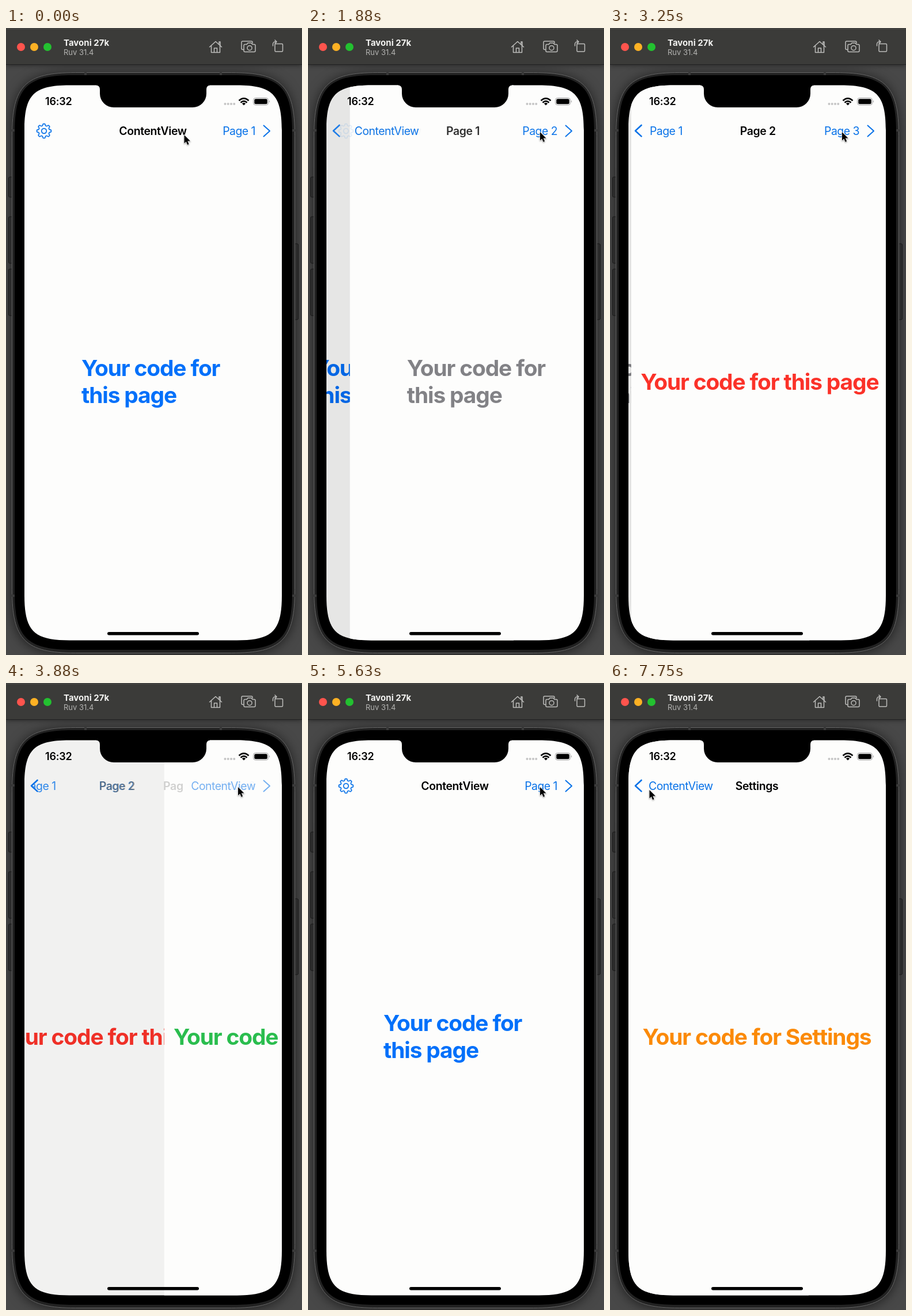
An HTML page for the animation above (8000 ms loop, 514 by 1090 pixels).

```html
<!DOCTYPE html>
<html lang="en">
<head>
<meta charset="utf-8">
<title>Navigation demo</title>
<style>
  html, body { margin: 0; width: 100%; height: 100%; overflow: hidden; background: #373737; }
  svg { display: block; font-family: Inter, sans-serif; }
  .line { fill: none; stroke-linecap: round; stroke-linejoin: round; }
  .title { font: 600 19.4px Inter, sans-serif; letter-spacing: -.35px; text-anchor: middle; }
  .label { font: 400 19.4px Inter, sans-serif; letter-spacing: -.5px; fill: #0872e8; }
  .body { font: 700 38.9px Inter, sans-serif; letter-spacing: -1.15px; }
</style>
</head>
<body>
<svg width="514" height="1090" viewBox="0 0 514 1090">
  <defs>
    <clipPath id="screen"><path data-box="32 99.500 447 965 54"/></clipPath>
    <clipPath id="backMask"><path d="M480 150H58V166L46 178.500L58 191V210H480Z"/></clipPath>
  </defs>

  <rect width="514" height="1090" fill="#484848"/>
  <path data-box="10.500 77.500 491 1009 76" fill="#222" style="filter:drop-shadow(0 2px 10px #0009)"/>
  <g fill="#2d2d2d" stroke="#191919">
    <rect x="4.500" y="259" width="8" height="35" rx="2"/>
    <rect x="4.500" y="328" width="8" height="81" rx="2"/>
    <rect x="4.500" y="419" width="8" height="81" rx="2"/>
    <rect x="499.500" y="375" width="8" height="132" rx="2"/>
  </g>
  <path data-box="10.500 77.500 491 1009 76" fill="#222" stroke="#676767"/>
  <path d="M10 178h5M497 178h5M10 987h5M497 987h5M138 77v5M373 77v5" stroke="#3a3a3a" stroke-width="4"/>
  <path data-box="15 82 482 999 70"/>

  <rect width="514" height="63" fill="#3b3b39" style="filter:drop-shadow(0 1px 4px #0008)"/>
  <path d="M0 1.500H514" stroke="#4b4b4a"/>
  <path d="M0 63.500H514" stroke="#222"/>
  <circle cx="26" cy="33" r="7" fill="#ff544d"/>
  <circle cx="49" cy="33" r="7" fill="#fdb124"/>
  <circle cx="72" cy="33" r="7" fill="#23c130"/>
  <text x="100" y="31" font-size="15" font-weight="700" fill="#f2f2f0">Tavoni 27k</text>
  <text x="100" y="47" font-size="13" fill="#b4b4b2">Ruv 31.4</text>
  <g class="line" stroke="#bdbdbb" stroke-width="1.500">
    <path d="M353.500 33L364 23.500L374.500 33M370 28.500V24h2v6M356.500 31V42.500H371.500V31M361.500 42V35h5v7"/>
    <path d="M412.500 37.500H411a2 2 0 0 1-2-2V25a2 2 0 0 1 2-2H426a2 2 0 0 1 2 2v1"/>
    <path d="M415 28.500h3l2-2.500h6l2 2.500h3a2 2 0 0 1 2 2V39.500a2 2 0 0 1-2 2H415a2 2 0 0 1-2-2V30.500a2 2 0 0 1 2-2Z"/>
    <circle cx="423" cy="34.700" r="4"/>
    <rect x="467" y="27.500" width="13.500" height="13.500" rx="1.500"/>
    <path d="M463.500 31V28a4 4 0 0 1 4-4h2M467 21l3 3l-3 3"/>
  </g>

  <g id="app" clip-path="url(#screen)"></g>

  <path d="M157 98V99.500Q163 100 163 107V114A24 24 0 0 0 187 138H324A24 24 0 0 0 348 114V107Q348 100 354 99.500V98Z"/>
  <text x="68" y="134.300" font-size="18" font-weight="600" letter-spacing="-.2">16:32</text>
  <g fill="#c5c5c5">
    <circle cx="380.500" cy="132" r="2"/><circle cx="385.700" cy="132" r="2"/>
    <circle cx="391" cy="132" r="2"/><circle cx="396.200" cy="132" r="2"/>
  </g>
  <path d="M404.500 126.200Q413 118.500 421.500 126.200M407.500 129.700Q413 124.700 418.500 129.700" fill="none" stroke="#000" stroke-width="2.600"/>
  <path d="M409.800 131.200Q413 128.600 416.200 131.200L413 134.500Z"/>
  <rect x="429.500" y="121.500" width="26" height="12.500" rx="4" fill="none" stroke="#a0a0a0"/>
  <rect x="431.200" y="123.200" width="22.600" height="9.100" rx="2.500"/>
  <path d="M457 125.500q2 2.200 0 4.400Z" fill="#999"/>
  <rect x="176" y="1050" width="159" height="5.500" rx="2.750"/>

  <path id="cursor" d="M0 0V14.500L3.300 11.500L5.600 17L8.100 16L5.800 10.600H10.500Z" stroke="#fff" stroke-width="1.200"
    paint-order="stroke" style="filter:drop-shadow(0 1px 1px #0006)"/>
</svg>
<script>
const LOOP = 8000, STEP = 125;
const LEFT = 32, WIDTH = 447, CENTER = 255, BACK_X = 67, RIGHT_X = 433;
const BLUE = '#0872e8';
const labelWidth = { ContentView: 111, Settings: 72 };
const widthOf = text => labelWidth[text] || 59;

const lines = ['Your code for', 'this page'], single = ['Your code for this page'];
const root = { title: 'ContentView', next: 'Page 1', color: '#0070fa', text: lines };
const page1 = { title: 'Page 1', back: 'ContentView', next: 'Page 2', color: '#828286', text: lines };
const page2 = { title: 'Page 2', back: 'Page 1', next: 'Page 3', color: '#fb3229', text: single };
const page3 = { title: 'Page 3', back: 'Page 2', next: 'ContentView', color: '#2abd4e', text: single };
const settings = { title: 'Settings', back: 'ContentView', color: '#fb8a08', text: ['Your code for Settings'] };

const moves = [
  { at: 0, under: root, top: page1, still: true },
  { at: 1613, under: root, top: page1 },
  { at: 2818, under: page1, top: page2 },
  { at: 3777, under: page2, top: page3 },
  { at: 4780, under: root, top: page3, pop: true },
  { at: 6850, under: root, top: settings },
];

const clamp = v => Math.max(0, Math.min(1, v));
const ease = v => (v = clamp(v), v * v * (3 - 2 * v));
const mix = (a, b, k) => a + (b - a) * k;
const spring = ms => { const s = Math.max(0, ms) * .015; return 1 - (1 + s) * Math.exp(-s); };
const fade = (alpha, content) => `<g opacity="${clamp(alpha).toFixed(3)}">${content}</g>`;
const text = (cls, x, y, content, extra = '') => `<text class="${cls}" x="${x}" y="${y}" ${extra}>${content}</text>`;
const stroke = (d, width) => `<path class="line" d="${d}" stroke="${BLUE}" stroke-width="${width}"/>`;

// Rounded box whose corners ease gradually into the straight sides.
function smoothBox(x, y, w, h, r) {
  const e = 1.45 * r, c = .3 * r, d = e - c;
  return `M${x} ${y + e}c0 ${-d} ${c} ${-e} ${e} ${-e}h${w - 2 * e}c${d} 0 ${e} ${c} ${e} ${e}`.replace(`c0 ${-d} ${c} ${-e}`, `c0 ${-d} ${c} ${-e}`)
    + `v${h - 2 * e}c0 ${d} ${-c} ${e} ${-e} ${e}h${2 * e - w}c${-d} 0 ${-e} ${-c} ${-e} ${-e}Z`;
}
for (const path of document.querySelectorAll('[data-box]'))
  path.setAttribute('d', smoothBox(...path.dataset.box.split(' ').map(Number)));

const gearEdge = Array.from({ length: 96 }, (_, i) => {
  const a = i * Math.PI / 48, r = 11 + 1.5 * Math.max(-1, Math.min(1, 1.8 * Math.cos(8 * a)));
  return `${(66 + r * Math.sin(a)).toFixed(2)} ${(179 - r * Math.cos(a)).toFixed(2)}`;
}).join('L');
const gear = stroke(`M${gearEdge}Z`, 1.7) + stroke('M70.300 179a4.300 4.300 0 1 1-8.600 0a4.300 4.300 0 1 1 8.600 0Z', 1.7);
const backChevron = stroke('M54.500 169L44 178.700L54.500 188.400', 2.6);
const nextChevron = stroke('M447.500 169.500L458 179L447.500 188.500', 2);

function page({ text: rows, color }, x, dim) {
  const body = rows.length > 1
    ? rows.map((row, i) => text('body', 131, 605 + 47 * i, row)).join('')
    : text('body', CENTER, 629, rows[0], 'text-anchor="middle"');
  return `<g transform="translate(${x.toFixed(2)})" fill="${color}">
    <rect x="${LEFT}" y="99" width="${WIDTH}" height="966" fill="#fdfdfc"/>${body}
    <rect x="${LEFT}" y="99" width="${WIDTH}" height="966" fill="#000" opacity="${dim}"/></g>`;
}

function navBar(under, top, p) {
  const titleLeft = CENTER - widthOf(under.title) / 2 - 2;
  const titleEnd = (top.next ? RIGHT_X - widthOf(top.next) : RIGHT_X) - 15;
  const enterShift = (1 - p) * (titleEnd - CENTER + widthOf(top.title) / 2);
  const leaveShift = p * (BACK_X - titleLeft);
  const nextLabel = s => s.next ? text('label', RIGHT_X, 185.5, s.next, 'text-anchor="end"') : '';
  const fadeIn = 1 - (1 - p) ** 1.6, nextOut = (1 - p) ** 6;
  const oldBack = under.back
    ? fade(1 - p * p, text('label', BACK_X - p * (BACK_X + widthOf(under.back) - LEFT), 185.5, under.back)) : '';
  const newBack = fade(fadeIn, text('label', mix(titleLeft, BACK_X, p), 185.5, top.back));
  const newTitle = fade(p ** 1.9, text('title', CENTER + enterShift, 185.5, top.title));
  return `<g clip-path="url(#backMask)">${oldBack}${newBack}</g>`
    + fade((1 - p) ** 1.8, text('title', CENTER + leaveShift, 185.5, under.title))
    + `<svg width="${titleEnd}" height="300">${newTitle}</svg>`
    + fade(nextOut, nextLabel(under)) + fade(fadeIn, nextLabel(top))
    + fade(top.next ? Math.max(nextOut, fadeIn) : nextOut, nextChevron)
    + fade(under.back ? 1 : p, backChevron)
    + (under.back ? '' : fade(1 - p, gear));
}

function render(t) {
  const { at, under, top, pop, still } = moves.findLast(m => m.at <= t);
  const progress = delay => still ? 0 : pop ? 1 - spring(t - at - delay) : spring(t - at - delay);
  const p = progress(0);
  app.innerHTML = page(under, -.3 * WIDTH * p, .1 * p) + page(top, WIDTH * (1 - p), 0) + navBar(under, top, progress(12));

  const toNext = ease((t - 200) / 1000), toGear = ease((t - 5650) / 900);
  const x = mix(mix(309.5, 403, toNext), 68.5, toGear);
  const y = mix(mix(186, 181, toNext), 186, toGear);
  cursor.setAttribute('transform', `translate(${x} ${y})`);
}

const app = document.getElementById('app'), cursor = document.getElementById('cursor');
let shown = -1;
function tick() {
  const step = Math.floor(performance.now() % LOOP / STEP);
  if (step !== shown) render((shown = step) * STEP + 5);
  requestAnimationFrame(tick);
}
tick();
</script>
</body>
</html>
```
